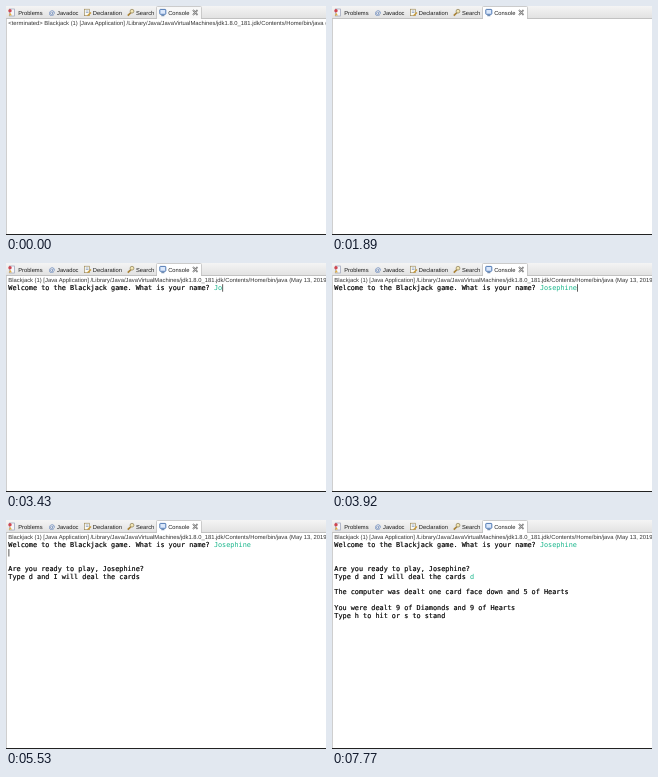
Write an HTML page that moves like this. It is 320 px wide and 229 px high and loops after 8 s.

```html
<!DOCTYPE html>
<html lang="en">
<head>
<meta charset="utf-8">
<title>Console card game</title>
<style>
  html, body { margin: 0; width: 100%; height: 100%; overflow: hidden; background: #fff; }
  svg { display: block; width: 320px; height: 229px; }
  text { text-rendering: geometricPrecision; white-space: pre; }
  .ui { font: 5.78px "Liberation Sans", Arial, sans-serif; fill: #1c1c1c; }
  #head { font-size: 5.85px; fill: #333; }
  .mono { font: 6.83px "DejaVu Sans Mono", monospace; fill: #000; stroke: #000; stroke-width: .18px; }
  .input { fill: #17b58a; stroke: none; }
</style>
</head>
<body>
<svg id="stage" viewBox="0 0 320 229" xmlns="http://www.w3.org/2000/svg">
  <defs>
    <linearGradient id="bar" x2="0" y2="1">
      <stop offset="0" stop-color="#f4f4f4"/>
      <stop offset="1" stop-color="#e2e2e2"/>
    </linearGradient>
  </defs>
  <rect width="320" height="229" fill="#fff"/>
  <rect width="320" height="12" fill="url(#bar)"/>
  <rect y="12" width="320" height="1" fill="#c2c2c2"/>
  <rect id="tab" x="151" y="1" width="44" height="12" fill="#fff"/>
  <path d="M150.500 12.500V1.500Q150.500 .5 151.500 .5H194.500Q195.500 .5 195.500 1.500V12.500" fill="none" stroke="#c2c2c2" stroke-width=".8"/>
  <rect y="13" width=".8" height="216" fill="#c4c4c4"/>
  <rect y="228" width="320" height="1" fill="#222"/>

  <!-- Problems -->
  <rect x="3.3" y="3" width="5.2" height="7" fill="#f5f6fa" stroke="#8a93ad" stroke-width=".6"/>
  <circle cx="4" cy="4.7" r="1.7" fill="#cf4550"/>
  <path d="M2.7 9.6L4.3 6.8L5.9 9.6Z" fill="#e0ad45"/>
  <!-- Javadoc -->
  <text x="42.8" y="8.7" class="ui" style="fill:#3f68ad;font-size:6.2px">@</text>
  <!-- Declaration -->
  <rect x="78.6" y="3.2" width="5" height="6.5" fill="#fbfaf3" stroke="#96814f" stroke-width=".6"/>
  <path d="M79.8 5H82.5M79.8 6.5H82.5" stroke="#6e86b8" stroke-width=".6"/>
  <path d="M81.5 9.8L85 6.5" stroke="#c79a3c" stroke-width="1.3"/>
  <!-- Search -->
  <path d="M121.8 9.6L125 6.5" stroke="#a98235" stroke-width="1.7"/>
  <circle cx="126" cy="5.2" r="1.9" fill="#f3e6b4" stroke="#8a7d55" stroke-width=".7"/>
  <!-- Console -->
  <rect x="153.8" y="3.4" width="6" height="4.9" rx=".6" fill="#dbe8fb" stroke="#3f6cac" stroke-width=".9"/>
  <path d="M155.3 9.7H158.4" stroke="#54749f"/>
  <path d="M187 4L191.5 9M191.5 4L187 9" stroke="#555" stroke-width="1.7"/>
  <path d="M187 4L191.5 9M191.5 4L187 9" stroke="#fff" stroke-width=".6"/>
</svg>
<script>
const LOOP = 8000, X0 = 2.3, CHAR = 6.83 * 0.602, LINE = 7.8;
const NAME = 'Josephine';
const stage = document.getElementById('stage');

function add(tag, attrs, content = '') {
  const el = document.createElementNS(stage.namespaceURI, tag);
  for (const key in attrs) el.setAttribute(key, attrs[key]);
  el.textContent = content;
  stage.append(el);
  return el;
}
const consoleText = (row, col, text, cls = 'mono') =>
  add('text', { x: X0 + col * CHAR, y: 27.3 + row * LINE, class: cls }, text);

[['Problems', 12.2], ['Javadoc', 51], ['Declaration', 86.8], ['Search', 130], ['Console', 162.2]]
  .forEach(([label, x]) => add('text', { x, y: 8.8, class: 'ui' }, label));

const tab = document.getElementById('tab');
const head = add('text', { id: 'head', class: 'ui', x: X0, y: 19 });
const LAUNCH = 'Blackjack (1) [Java Application] /Library/Java/JavaVirtualMachines/' +
  'jdk1.8.0_181.jdk/Contents/Home/bin/java (May 13, 2019';

const GREEN = 'mono input';
const typed = consoleText(0, 50, '', GREEN);
// [time shown, element]
const output = [
  [2100, consoleText(0, 0, 'Welcome to the Blackjack game. What is your name?')],
  [4410, consoleText(3, 0, `Are you ready to play, ${NAME}?`)],
  [4410, consoleText(4, 0, 'Type d and I will deal the cards')],
  [5600, consoleText(4, 33, 'd', GREEN)],
  [6020, consoleText(6, 0, 'The computer was dealt one card face down and 5 of Hearts')],
  [6020, consoleText(8, 0, 'You were dealt 9 of Diamonds and 9 of Hearts')],
  [6020, consoleText(9, 0, 'Type h to hit or s to stand')]
];

const caret = add('rect', { width: 0.8, height: 7.5, fill: '#333' });
// [from, to, row, column]; no column: follows the typed name
const carets = [
  [1820, 1890, 0, 0], [2100, 2520, 0, 0], [3360, 4340, 0],
  [4340, 4970, 1, 0], [5530, 5600, 1, 0], [5600, 5950, 4, 34],
  [5950, 6580, 5, 0], [7140, 7770, 5, 0]
];

const show = (el, on) => el.setAttribute('visibility', on ? 'visible' : 'hidden');

function typedCount(t) {
  if (t < 3150) return 0;
  if (t < 3430) return 1;
  return Math.min(NAME.length, 2 + Math.floor((t - 3430) / 70));
}

function draw(t) {
  tab.setAttribute('fill', t < 140 ? '#f8f8f8' : '#fff');
  head.textContent = t < 1890 ? '<terminated> ' + LAUNCH : t < 2030 ? '' : LAUNCH;
  const count = typedCount(t);
  typed.textContent = NAME.slice(0, count);
  output.forEach(([at, el]) => show(el, t >= at));

  const spot = carets.find(([from, to]) => t >= from && t < to);
  show(caret, spot);
  if (spot) {
    const [, , row, col = 50 + count] = spot;
    caret.setAttribute('x', X0 + col * CHAR + 0.2);
    caret.setAttribute('y', 21.2 + row * LINE);
  }
}

function frame() {
  draw(performance.now() % LOOP);
  requestAnimationFrame(frame);
}
frame();
</script>
</body>
</html>
```
